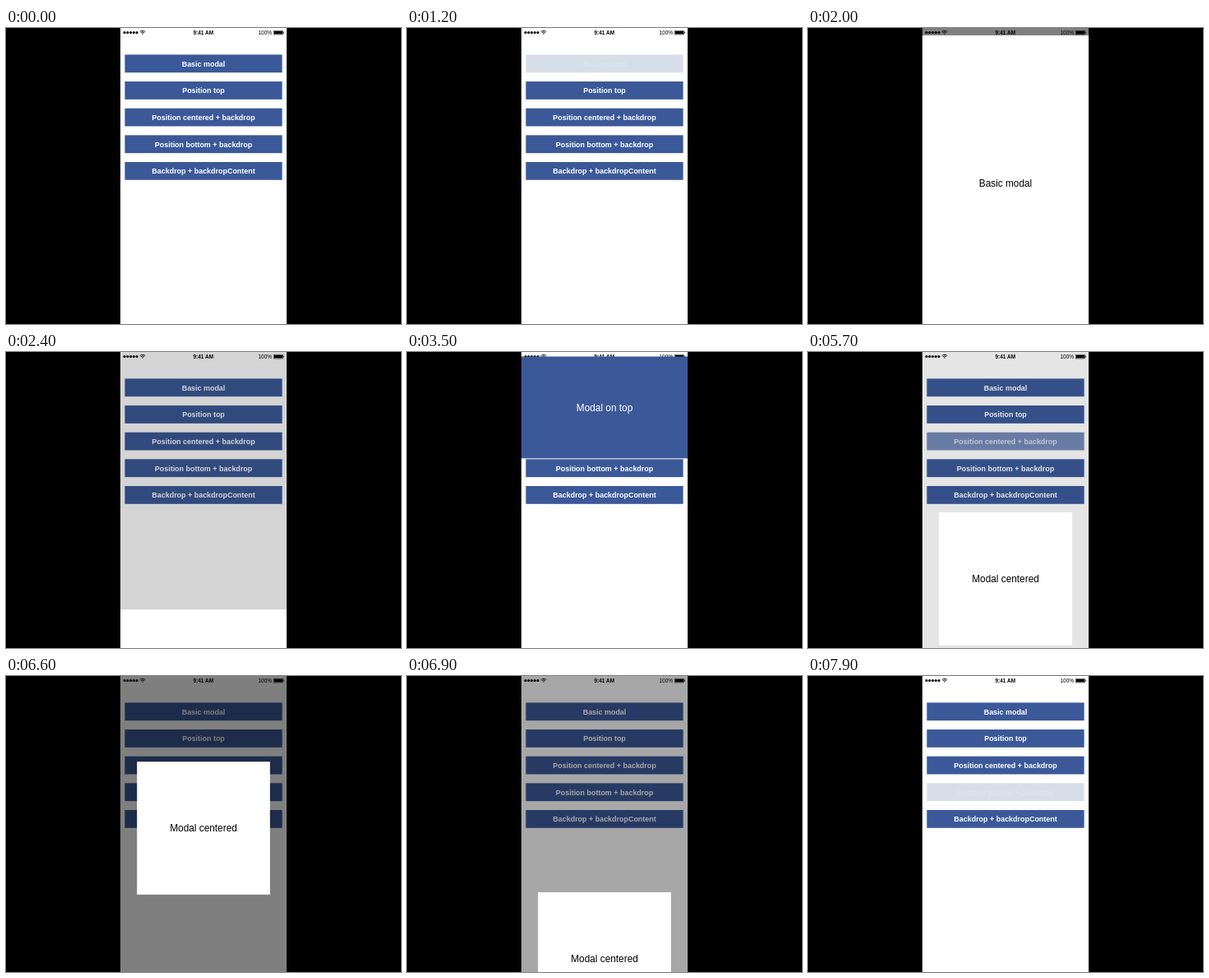
An HTML page with a canvas that plays this animation: 480x360 px, repeating every 8 s.

```html
<!DOCTYPE html>
<html lang="en">
<head>
<meta charset="utf-8">
<title>Modal demo</title>
<style>
html, body { margin: 0; width: 100%; height: 100%; overflow: hidden; background: #000; }
canvas { display: block; }
</style>
</head>
<body>
<canvas id="stage" width="480" height="360"></canvas>
<script>
const ctx = document.getElementById('stage').getContext('2d');
const LOOP = 8000, STEP = 100;
const LEFT = 139, WIDTH = 202, HEIGHT = 360, MID = 240;
const BLUE = '#3b5998';
const FONT = '"Liberation Sans", Arial, sans-serif';
const LABELS = ['Basic modal', 'Position top', 'Position centered + backdrop',
  'Position bottom + backdrop', 'Backdrop + backdropContent'];

// press, open, drag, release: times in ms; pull: drag distance at release; power: drag curve
const MODALS = [
  { button: 0, press: 1100, open: 1283, drag: 1950, release: 2158, pull: 222, power: 2.25,
    text: 'Basic modal', x: LEFT, y: 0, w: WIDTH, h: HEIGHT, fill: '#fff', ink: '#000', backdrop: true },
  { button: 1, press: 3100, open: 3283, drag: 4050, release: 4430, pull: 180, power: 4,
    text: 'Modal on top', x: LEFT, y: 0, w: WIDTH, h: 123.9, fill: BLUE, ink: '#fff', backdrop: false },
  { button: 2, press: 5400, open: 5583, drag: 6250, release: 6750, pull: 120, power: 8.9,
    text: 'Modal centered', x: 159.2, y: 99.2, w: 161.6, h: 161.6, fill: '#fff', ink: '#000', backdrop: true },
  { button: 3, press: 7900, open: 9000 }
];

const clamp = v => Math.min(1, Math.max(0, v));

// symmetric ease-in-out built from cubic-bezier(.42, 0, 1, 1)
function ease(v) {
  v = clamp(v);
  if (v > 0.5) return 1 - ease(1 - v);
  let lo = 0, hi = 1;
  for (let i = 0; i < 24; i++) {
    const s = (lo + hi) / 2, r = 1 - s;
    if (1.26 * r * r * s + 3 * r * s * s + s * s * s < 2 * v) lo = s; else hi = s;
  }
  return (3 * lo * lo - 2 * lo * lo * lo) / 2;
}

// damped spring from 0 to 1, stiffness 230.2, damping 22
function spring(ms) {
  const s = ms / 1000, w = Math.sqrt(230.2 - 121);
  return 1 - Math.exp(-11 * s) * (Math.cos(w * s) + 11 / w * Math.sin(w * s));
}

function offset(m, t) {
  const travel = HEIGHT - m.y;
  if (t < m.drag) return travel * (1 - spring(t - m.open));
  if (t < m.release) return m.pull * ((t - m.drag) / (m.release - m.drag)) ** m.power;
  return m.pull + (travel - m.pull) * ease((t - m.release) / 400);
}

function rect(x, y, w, h, fill) {
  ctx.fillStyle = fill;
  ctx.fillRect(x, y, w, h);
}

function text(str, x, y, font, fill, align = 'center') {
  ctx.font = font + ' ' + FONT;
  ctx.textAlign = align;
  ctx.fillStyle = fill;
  ctx.fillText(str, x, y);
}

function statusBar() {
  ctx.fillStyle = ctx.strokeStyle = '#000';
  for (let i = 0; i < 5; i++) {
    ctx.beginPath();
    ctx.arc(144 + i * 3.75, 5.5, 1.55, 0, 7);
    ctx.fill();
  }
  ctx.lineWidth = 0.9;
  for (const r of [1.2, 3, 4.7]) {
    ctx.beginPath();
    ctx.arc(166, 8, r, -Math.PI * 0.75, -Math.PI * 0.25);
    ctx.stroke();
  }
  text('9:41 AM', 239.7, 7.9, 'bold 6.4px', '#000');
  text('100%', 323, 7.9, '6.45px', '#000', 'right');
  ctx.lineWidth = 0.5;
  ctx.strokeRect(325.2, 3.2, 11.4, 4.8);
  rect(325.8, 3.8, 10.2, 3.6, '#000');
  rect(337.1, 4.7, 0.8, 1.8, '#000');
}

function buttonAlpha(i, t) {
  const m = MODALS.find(m => m.button === i);
  if (!m || t < m.press) return 1;
  return t < m.open ? 0.2 : 0.2 + 0.8 * ease((t - m.open) / 200);
}

function draw(t) {
  rect(0, 0, 480, 360, '#000');
  ctx.save();
  ctx.beginPath();
  ctx.rect(LEFT, 0, WIDTH, HEIGHT);
  ctx.clip();
  rect(LEFT, 0, WIDTH, HEIGHT, '#fff');
  statusBar();
  LABELS.forEach((label, i) => {
    const y = 32.4 + i * 32.65;
    ctx.globalAlpha = buttonAlpha(i, t);
    rect(144.4, y, 191.2, 21.8, BLUE);
    text(label, MID, y + 14.3, 'bold 8.95px', '#fff');
  });
  ctx.globalAlpha = 1;

  const m = MODALS.find(m => t >= m.open && t < m.release + 400);
  if (m) {
    if (m.backdrop) {
      const shade = ease((t - m.open) / 400) - ease((t - m.release) / 400);
      rect(LEFT, 0, WIDTH, HEIGHT, `rgba(0,0,0,${shade / 2})`);
    }
    const y = m.y + offset(m, t);
    rect(m.x, y, m.w, m.h, m.fill);
    text(m.text, MID, y + m.h / 2 + 4.2, '11.85px', m.ink);
  }
  ctx.restore();
}

const start = performance.now();
function tick() {
  const t = (performance.now() - start) % LOOP;
  draw(Math.floor(t / STEP) * STEP);
  requestAnimationFrame(tick);
}
tick();
</script>
</body>
</html>
```
